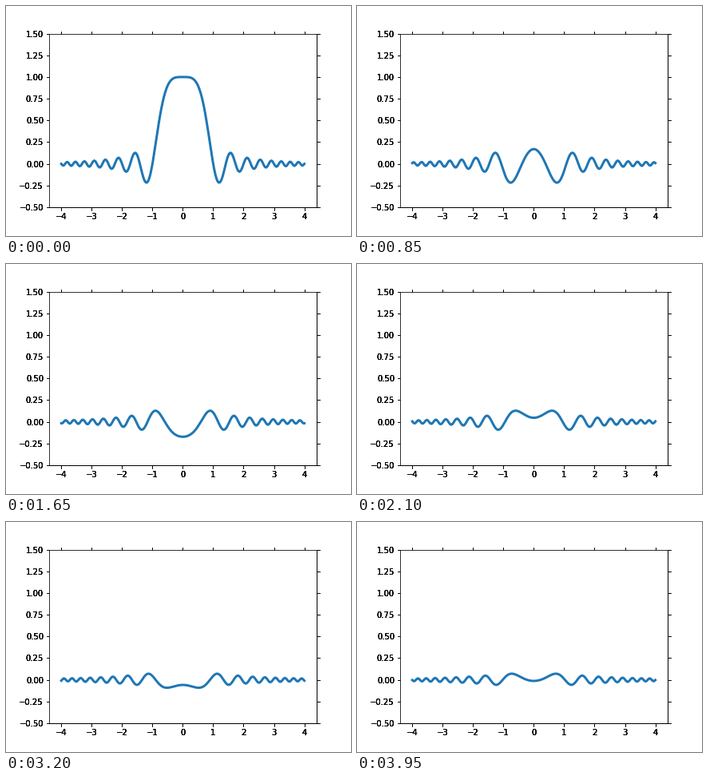
A matplotlib script for the animation above (4000 ms loop, 432 by 288 pixels).

```python
import numpy as np
import matplotlib.pyplot as plt
from matplotlib.animation import FuncAnimation

FRAMES = 80
INTERVAL = 50
LAYERS = 4  # stacked axes give the heavy, dark tick labels

plt.rcParams["font.family"] = "DejaVu Sans"
plt.rcParams["font.size"] = 10

x = np.linspace(-4, 4, 200)


def wave(t):
    return np.sinc(x**2 + t)


def add_axes(fig):
    ax = fig.add_axes([0.125, 0.125, 0.775, 0.755])
    ax.set_xlim(-4.4, 4.4)
    ax.set_ylim(-0.5, 1.5)
    ax.set_xticks(range(-4, 5))
    ax.set_yticks(np.arange(-0.5, 1.51, 0.25))
    ax.tick_params(top=True, right=True)
    return ax


fig = plt.figure(figsize=(6, 4), dpi=72, facecolor="white")
for _ in range(LAYERS):
    ax = add_axes(fig)
line, = ax.plot(x, wave(0), color="#1f77b4", lw=3)


def update(i):
    line.set_ydata(wave(i * INTERVAL / 1000))
    return line,


anim = FuncAnimation(fig, update, frames=FRAMES, interval=INTERVAL,
                     repeat=True, repeat_delay=0)
plt.show()
```
